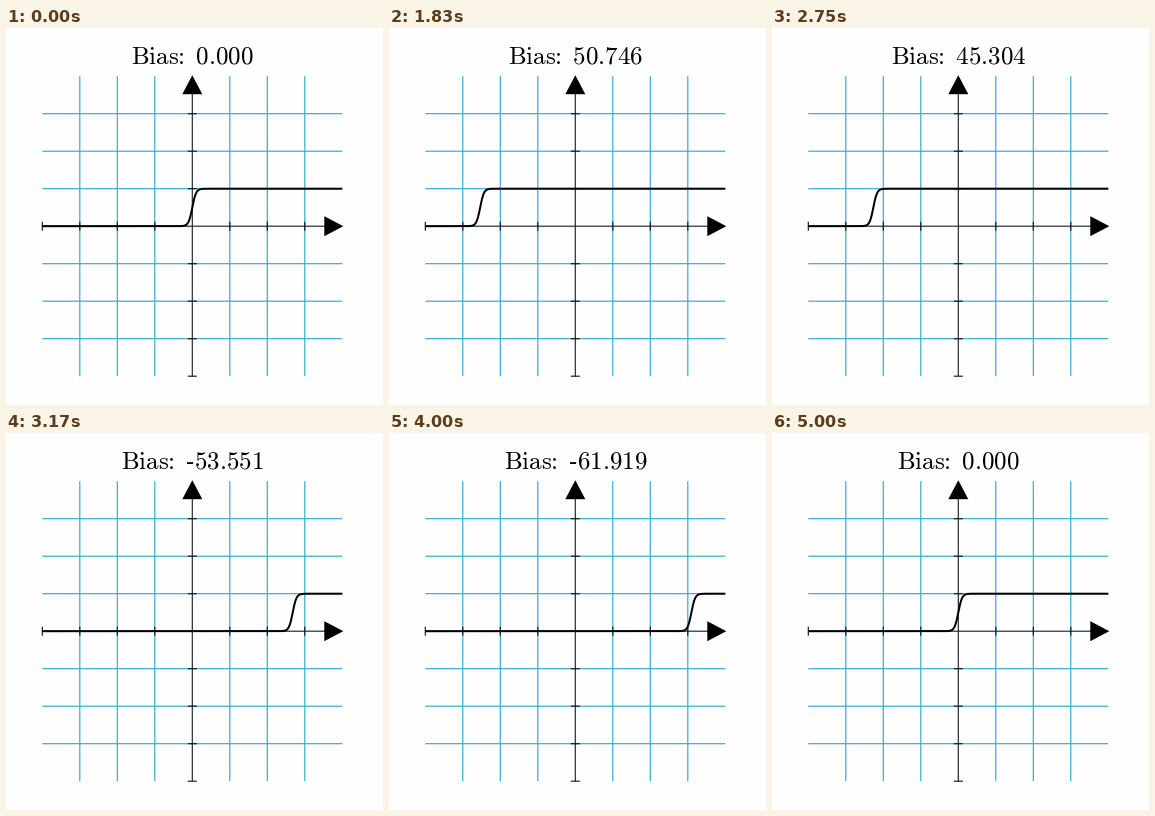
Animation, 377 px wide and 377 px high, one loop 5080 ms. Source, as a matplotlib script:

```python
import numpy as np
import matplotlib.pyplot as plt
from matplotlib.animation import FuncAnimation
from matplotlib.collections import LineCollection

SIZE, DPI = 377, 100
PT = 72 / DPI                 # points per pixel
CX, CY, UNIT = 186.3, 198.2, 37.5
HALF = 4 * UNIT

LOOP_MS, TICK_MS = 5080, 20
FPS = 12
HOLD, MOVE = 12, 7            # opening pause and length of a move, in steps
WEIGHT = 20
BIASES = [0, 41.380, 60.112, 45.304, -56.412, -63.116, -20.575, 0]

plt.rcParams["mathtext.fontset"] = "cm"


def sigmoid(z):
    return 1 / (1 + np.exp(-np.clip(z, -60, 60)))


def smooth(t, steep=10):
    edge = sigmoid(-steep / 2)
    return (sigmoid(steep * (t - 0.5)) - edge) / (1 - 2 * edge)


def bias_at(step):
    if step < HOLD:
        return BIASES[0]
    move, j = divmod(step - HOLD, MOVE)
    a, b = BIASES[move:move + 2]
    return a + (b - a) * smooth(j / (MOVE - 1))


def label(bias):
    number = f"{bias:.3f}".replace("-", "\u2010")
    return rf"$\text{{Bias:}}\hspace{{0.5}}\text{{{number}}}$"


def add_lines(segments, color, width, z):
    lines = LineCollection(segments, colors=color, linewidths=width * PT, zorder=z)
    lines.set_snap(False)
    ax.add_collection(lines)


fig = plt.figure(figsize=(SIZE / DPI, SIZE / DPI), dpi=DPI, facecolor="#fefdff")
ax = fig.add_axes([0, 0, 1, 1])
ax.set_xlim(0, SIZE)
ax.set_ylim(SIZE, 0)
ax.axis("off")

left, right = CX - HALF, CX + HALF
top, bottom = CY - HALF, CY + HALF

grid, ticks = [], []
for k in range(-4, 4):
    x, y = CX + k * UNIT, CY - k * UNIT
    if k == 0:
        continue
    if k > -4:
        grid += [[(x, top), (x, bottom)], [(left, y), (right, y)]]
    ticks += [[(x, CY - 4.5), (x, CY + 4.5)], [(CX - 4.5, y), (CX + 4.5, y)]]
axes = [[(CX, top + 10), (CX, bottom)], [(left, CY), (right - 10, CY)]]

add_lines(grid, "#29abca", 1.15, 1)
add_lines(axes, "#16262c", 1.15, 2)
add_lines(ticks, "#101418", 1.15, 2)

tips = [
    [(CX, top - 1), (CX - 10, top + 18), (CX + 10, top + 18)],
    [(right + 1, CY), (right - 18, CY - 10), (right - 18, CY + 10)],
]
for tip in tips:
    ax.add_patch(plt.Polygon(tip, facecolor="black", edgecolor="none", zorder=3))

xs = np.linspace(-4, 4, 801)
curve, = ax.plot([], [], color="black", lw=2 * PT, zorder=4,
                 solid_capstyle="butt", snap=False)
title = ax.text(CX + 0.2, 35.5, "", fontsize=25 * PT, color="black",
                ha="center", va="baseline")


def update(i):
    step = (i * TICK_MS + 15) * FPS // 1000
    bias = bias_at(step)
    curve.set_data(CX + UNIT * xs, CY - UNIT * sigmoid(WEIGHT * xs + bias))
    title.set_text(label(bias))
    return curve, title


def init():
    return update(0)


anim = FuncAnimation(fig, update, frames=LOOP_MS // TICK_MS, init_func=init,
                     interval=TICK_MS, repeat=True, repeat_delay=0, blit=False)
plt.show()
```
